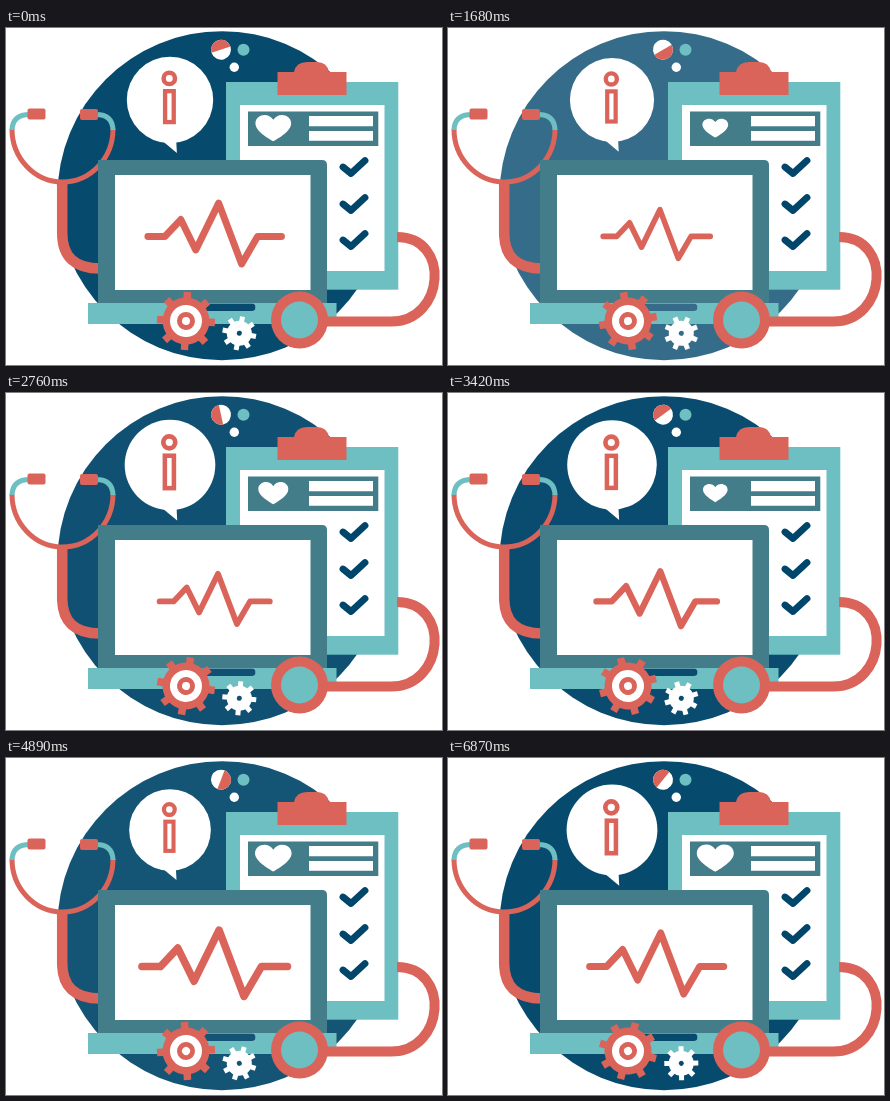
These frames come from a looping animation (436 px wide and 337 px high, 6900 ms). An HTML page:

```html
<!DOCTYPE html>
<html lang="en">
<head>
<meta charset="utf-8">
<title>Online health check</title>
<style>
  html, body { margin: 0; width: 100%; height: 100%; overflow: hidden; background: #fff; }
  svg { display: block; width: 100vw; height: 100vh; }
  .navy { fill: #00466a; }
  .teal { fill: #6ebfc2; }
  .slate { fill: #447d8a; }
  .red { fill: #da6459; }
  .white { fill: #fff; }
  .line { fill: none; stroke: #da6459; }
  .round { stroke-linecap: round; stroke-linejoin: round; }
  .tooth { stroke-width: 7.5; }
  .small .tooth { stroke: #fff; stroke-width: 5; }
</style>
</head>
<body>
<svg viewBox="0 0 436 337" preserveAspectRatio="none">
  <circle class="navy fade" cx="216" cy="167.7" r="164.5"/>

  <!-- pill and dots -->
  <g id="pill">
    <circle class="white" r="10"/>
    <path class="red" d="M0-10A10 10 0 0 1 0 10Z"/>
  </g>
  <circle class="teal" cx="237.5" cy="21.7" r="6"/>
  <circle class="white" cx="228.3" cy="39.2" r="4.7"/>

  <!-- speech bubble -->
  <g id="bubble">
    <circle class="white" r="44"/>
    <path class="white" d="M-11 39L7 54L6 34Z"/>
    <circle class="line" cx="-.7" cy="-22" r="5.8" stroke-width="4.6"/>
    <rect class="line" x="-5" y="-9" width="8.8" height="31.5" stroke-width="4.4"/>
  </g>

  <!-- stethoscope -->
  <path class="line" d="M56.2 154V205Q56.2 240.5 94 240.5" stroke-width="10.5"/>
  <path class="line" d="M6 101A50.5 53 0 0 0 107 101" stroke-width="5"/>
  <g fill="none" stroke="#6ebfc2" stroke-width="5">
    <path d="M6 102Q6.500 86.500 24 86.500"/>
    <path d="M107 102Q106.500 86.500 90 86.500"/>
  </g>
  <rect class="red" x="21.500" y="80.500" width="18" height="11" rx="2"/>
  <rect class="red" x="74" y="81" width="18" height="11" rx="2"/>

  <!-- clipboard -->
  <rect class="teal" x="220" y="54" width="172.300" height="207.700"/>
  <rect class="white" x="234" y="77" width="144.500" height="166"/>
  <path class="red" d="M271.500 67V44H288Q290 34 301 34H311Q321 34 323 44H340.500V67Z"/>
  <rect class="slate" x="242" y="83.500" width="130.300" height="34.500"/>
  <path class="white" d="M303 88h64v10.300h-64zM303 103h64v9.700h-64z"/>
  <path id="heart" class="white"
    d="M0 13C-5 10-17.500 3-17.500-4.500C-17.500-13-5-16 0-8C5-16 17.500-13 17.500-4.500C17.500 3 5 10 0 13Z"/>
  <g id="checks" class="round" fill="none" stroke="#00466a" stroke-width="6.800"></g>

  <!-- laptop -->
  <path class="slate" d="M92 276V132H316Q321 132 321 137V276Z"/>
  <rect class="white" x="109" y="147" width="195.500" height="115"/>
  <rect class="teal" x="82" y="275" width="248.500" height="21"/>
  <rect class="white" x="164" y="275.500" width="85.500" height="7.500" rx="3.500"/>
  <rect class="navy fade" x="164" y="275.500" width="85.500" height="7.500" rx="3.500"/>
  <path id="pulse" class="line round" stroke-width="7"
    d="M-67 .5H-50L-34-16.500L-19 14L4-33L27 28L43 .5H67"/>

  <!-- gears -->
  <g id="gear">
    <g class="line teeth" data-r="29"></g>
    <circle class="red" r="23.500"/>
    <circle class="white" r="16"/>
    <circle class="red" r="9"/>
    <circle class="white" r="4"/>
  </g>
  <g id="cog" class="small">
    <g class="line teeth" data-r="17"></g>
    <circle class="white" r="12.500"/>
    <circle class="navy fade" r="2.500"/>
  </g>

  <!-- chest piece -->
  <path class="line" d="M318 293.500H385C439 293.500 445 209 391 209" stroke-width="10"/>
  <circle class="red" cx="293.500" cy="292" r="28.500"/>
  <circle class="teal" cx="293.500" cy="292" r="18.500"/>
</svg>
<script>
const LOOP = 6900;
const $ = id => document.getElementById(id);
const fades = document.querySelectorAll('.fade');

$('checks').innerHTML = [0, 37, 73]
  .map(y => `<path d="M337 ${139 + y}l8 6.500l14-13"/>`).join('');

for (const g of document.querySelectorAll('.teeth'))
  for (let a = 0; a < 360; a += 45)
    g.innerHTML += `<path class="tooth" d="M0-8V-${g.dataset.r}" transform="rotate(${a})"/>`;

// Cosine that is 1 at the time `peak`
const wave = (t, peak, period) => Math.cos(2 * Math.PI * (t - peak) / period);

// Narrow bump, once per loop
const bump = (t, peak) => ((1 + wave(t, peak, LOOP)) / 2) ** 4;

function place(id, x, y, change) {
  $(id).setAttribute('transform', `translate(${x} ${y}) ${change}`);
}

let start;
function draw(now) {
  start ??= now;
  const t = (now - start) % LOOP;
  const turn = t / 10;

  const opacity = 1 - .21 * bump(t, 1550) - .085 * bump(t, 4550);
  fades.forEach(el => el.setAttribute('opacity', opacity));

  place('bubble', 164, 72, `scale(${.98 + .052 * wave(t, 2950, 3900)})`);
  place('heart', 267.3, 100, `scale(${.87 + .19 * wave(t, 3982, 970)})`);
  place('pulse', 208.7, 208, `scale(${.95 + .16 * wave(t, 5500, LOOP)})`);

  place('pill', 215, 21.7, `rotate(${252 + turn})`);
  place('gear', 180, 293, `rotate(${3 + turn})`);
  place('cog', 233.3, 305.3, `rotate(${11 - turn})`);
  requestAnimationFrame(draw);
}
requestAnimationFrame(draw);
</script>
</body>
</html>
```
